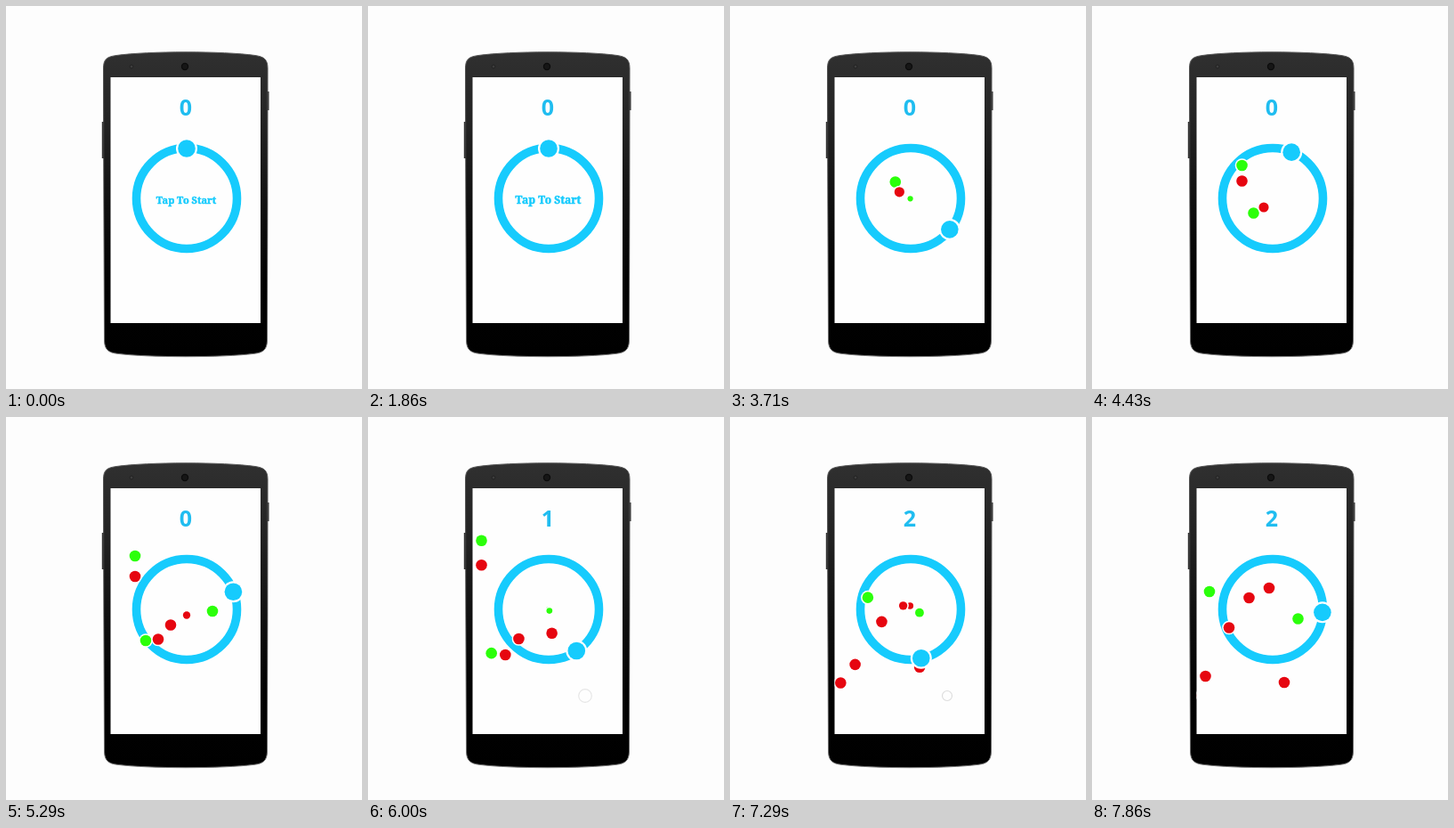
An HTML page with a canvas that plays this animation: 400x430 px, repeating every 8000 ms.

```html
<!DOCTYPE html>
<html lang="en">
<head>
<meta charset="utf-8">
<title>Ring game</title>
<style>
html, body { margin: 0; width: 100%; height: 100%; overflow: hidden; background: #fdfdfd; }
canvas { display: block; width: 400px; height: 430px; }
</style>
</head>
<body>
<canvas id="stage"></canvas>
<script>
const LOOP = 8000, STEP = LOOP / 56;
const CX = 203, CY = 216, RING = 56.5;
const BLUE = '#16cbfd', GREEN = '#2bff0a', RED = '#e60610';
const canvas = document.getElementById('stage');
const dpr = window.devicePixelRatio || 1;
canvas.width = 400 * dpr;
canvas.height = 430 * dpr;
const ctx = canvas.getContext('2d');
ctx.scale(dpr, dpr);

// Ball angle in degrees clockwise from the top: [seconds, angle]
const swing = [[0, 0], [2.162, 0], [2.857, -104], [4.43, -338], [4.7, -378],
  [5.29, -290], [5.9, -199], [6.571, -299.4], [7.32, -187], [7.86, -267]];
const taps = [2.13, 4.69, 5.85, 6.56, 7.27];

// Each dot flies out from the middle: colour, birth, death, then [seconds, x, y]
const A = 4.429, B = 5.286, C = 6.571, D = 7.857;
const dots = [
  [GREEN, 3.0, 9, [A, 168.5, 179], [B, 145, 156], [C, 113.5, 125]],
  [RED, 3.3, 9, [A, 168.5, 196.5], [B, 145, 179], [C, 113.5, 156]],
  [GREEN, 3.7, 9, [A, 181.5, 232.5], [B, 157, 251], [C, 124, 276.5]],
  [RED, 4.05, 9, [A, 193, 226], [B, 171, 249.5], [C, 141, 281]],
  [RED, 4.58, 9, [B, 185, 233.5], [C, 157, 261.5], [D, 127.5, 291]],
  [GREEN, 4.5, 5.56, [B, 232, 218]],
  [RED, 5.12, 9, [B, 203, 222.5], [C, 209.5, 259], [D, 216, 298]],
  [GREEN, 6.0, 9, [C, 183.5, 211], [D, 132, 196]],
  [RED, 6.2, 9, [C, 191, 221.5], [D, 154, 236.5]],
  [GREEN, 5.95, 7.13, [C, 213.5, 236]],
  [RED, 7.17, 9, [D, 199, 192]],
  [RED, 7.02, 9, [D, 176.5, 203]],
  [GREEN, 6.98, 9, [D, 231.5, 226.5]]
];

// Piecewise linear value, running on past the last key
function track(keys, t, col) {
  let i = 1;
  while (i < keys.length - 1 && t > keys[i][0]) i++;
  const a = keys[i - 1], b = keys[i];
  return a[col] + (b[col] - a[col]) * (t - a[0]) / (b[0] - a[0]);
}

function disc(x, y, r, fill, edge, width) {
  ctx.beginPath();
  ctx.arc(x, y, r, 0, Math.PI * 2);
  if (fill) { ctx.fillStyle = fill; ctx.fill(); }
  if (edge) { ctx.strokeStyle = edge; ctx.lineWidth = width; ctx.stroke(); }
}

function shade(x0, y0, x1, y1, ...colours) {
  const g = ctx.createLinearGradient(x0, y0, x1, y1);
  colours.forEach((c, i) => g.addColorStop(i / (colours.length - 1), c));
  return g;
}

function drawPhone() {
  ctx.fillStyle = '#333';
  ctx.fillRect(293, 96, 2.5, 21);
  ctx.fillRect(107.8, 130, 2.5, 41);
  ctx.beginPath();
  ctx.moveTo(109.5, 70);
  ctx.bezierCurveTo(109.5, 60, 113, 57, 124, 55.5);
  ctx.bezierCurveTo(160, 50.5, 244, 50.5, 280, 55.5);
  ctx.bezierCurveTo(290, 57, 294, 60, 294, 70);
  ctx.lineTo(293.5, 376);
  ctx.bezierCurveTo(293, 386, 289, 389, 279, 390.3);
  ctx.bezierCurveTo(244, 394.8, 160, 394.8, 125, 390.3);
  ctx.bezierCurveTo(115, 389, 111, 386, 110.5, 376);
  ctx.closePath();
  ctx.fillStyle = shade(0, 52, 0, 394, '#303030', '#222', '#101010', '#020202', '#000');
  ctx.fill();
  ctx.strokeStyle = shade(0, 52, 0, 394, '#555', '#333', '#777');
  ctx.lineWidth = 1;
  ctx.stroke();
  disc(201, 68, 3.6, '#161616', '#0b0b0b', 1.2);
  disc(141, 68, 2, '#3d3d3d', '#222', 1);
  ctx.fillStyle = '#fefefe';
  ctx.fillRect(117.5, 80, 168.5, 276);
}

function drawLabel(t) {
  const alpha = Math.min(1, Math.max(0, (2.43 - t) / 0.287));
  if (!alpha) return;
  const scale = (80 - 5 * Math.cos(2 * Math.PI * t / 1.414)) / 75;
  ctx.save();
  ctx.globalAlpha = alpha;
  ctx.translate(202.5, 218);
  ctx.scale(scale, scale);
  ctx.font = '900 11px "Noto Serif", serif';
  ctx.fillStyle = ctx.strokeStyle = BLUE;
  ctx.lineWidth = 0.5;
  ctx.lineJoin = 'round';
  ctx.fillText('Tap To Start', 0, 4);
  ctx.strokeText('Tap To Start', 0, 4);
  ctx.restore();
}

function drawDot([colour, birth, death, ...path], t) {
  if (t < birth || t >= death) return;
  const keys = [[birth, CX, CY], ...path];
  const x = track(keys, t, 1), y = track(keys, t, 2);
  const r = Math.min(6.3, 3 + 0.18 * Math.hypot(x - CX, y - CY));
  disc(x, y, r + 1.5, '#fff');
  disc(x, y, r, colour);
}

function drawTap(age) {
  if (age < 0 || age > 0.45) return;
  const k = age / 0.45;
  ctx.globalAlpha = 1 - k;
  disc(244, 313, 5.3 + 6 * k, null, '#dcdcdc', 1.2);
  ctx.globalAlpha = 1;
}

function draw(t) {
  ctx.fillStyle = '#fdfdfd';
  ctx.fillRect(0, 0, 400, 430);
  drawPhone();
  ctx.save();
  ctx.beginPath();
  ctx.rect(117.5, 80, 168.5, 276);
  ctx.clip();
  ctx.textAlign = 'center';

  ctx.font = 'bold 25px "Noto Sans", sans-serif';
  ctx.fillStyle = '#20bdf0';
  ctx.fillText(t < 5.56 ? '0' : t < 7.13 ? '1' : '2', 202, 122.5);

  disc(CX, CY, RING, null, BLUE, 9.6);
  drawLabel(t);
  taps.forEach(at => drawTap(t - at));
  dots.forEach(d => drawDot(d, t));

  const a = track(swing, t, 1) * Math.PI / 180;
  const x = CX + 56 * Math.sin(a), y = CY - 56 * Math.cos(a);
  disc(x, y, 12, '#fff');
  disc(x, y, 9.8, BLUE);
  ctx.restore();
}

function tick() {
  const n = Math.floor((performance.now() % LOOP) / STEP + 0.03) % 56;
  draw(n * STEP / 1000);
  requestAnimationFrame(tick);
}
tick();
</script>
</body>
</html>
```
